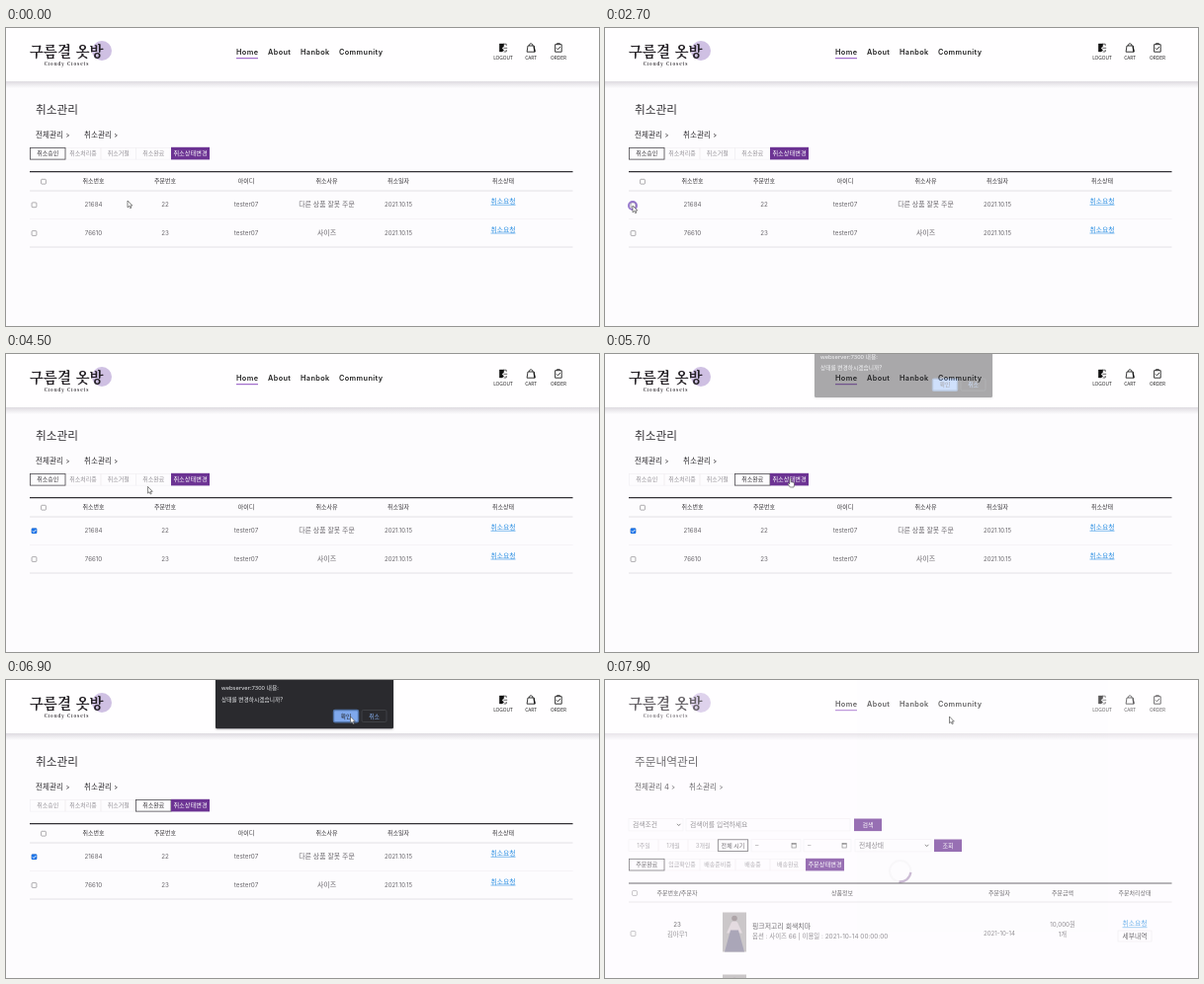
Animation, 600 px wide and 302 px high, one loop 8000 ms. Source, as an HTML page:

```html
<!DOCTYPE html>
<html lang="ko">
<head>
<meta charset="utf-8">
<title>취소관리</title>
<style>
html, body { margin: 0; width: 100%; height: 100%; overflow: hidden; background: #fdfcfe; }
svg { display: block; width: 100vw; height: 100vh; }
text { font-family: Inter, "Noto Sans CJK KR", "Noto Sans CJK", sans-serif; white-space: pre; }
.brand { font-family: "Noto Serif CJK KR", "Noto Serif", "Noto Sans CJK KR", serif; }
.plain { font-family: "Noto Sans", "Noto Sans CJK KR", "Noto Sans CJK", sans-serif; }
</style>
</head>
<body>
<svg id="stage" viewBox="0 0 600 302"></svg>
<script>
const LOOP = 8000, STEP = 100;
const PURPLE = '#6c3393', INK = '#343236', GREY = '#69666b', PALE = '#949197', LINK = '#2b8fe2';

// y is the vertical middle of the text
const text = (x, y, str, size = 6, fill = INK, anchor = 'middle', more = '') =>
  `<text x="${x}" y="${(y + size * .36).toFixed(2)}" font-size="${size}" fill="${fill}" text-anchor="${anchor}" ${more}>${str}</text>`;
const left = (x, y, str, size, fill, more) => text(x, y, str, size, fill, 'start', more);
const rect = (x, y, w, h, fill, more = '') =>
  `<rect x="${x}" y="${y}" width="${w}" height="${h}" fill="${fill}" ${more}/>`;
const frame = (x, y, w, h, stroke, width = .7) =>
  rect(x, y, w, h, 'none', `stroke="${stroke}" stroke-width="${width}"`);
const path = (d, stroke, width = .8, fill = 'none') =>
  `<path d="${d}" fill="${fill}" stroke="${stroke}" stroke-width="${width}"/>`;
const rule = (y, color, width) => path(`M24 ${y}H573.5`, color, width);
const group = (id, body) => `<g id="${id}">${body}</g>`;

const checkbox = (x, y) => rect(x - 2.4, y - 2.4, 4.8, 4.8, '#fff', 'rx=".8" stroke="#77747a" stroke-width=".6"');
const checked = (x, y) => rect(x - 2.7, y - 2.7, 5.4, 5.4, '#1a73e8', 'rx=".8"') +
  path(`M${x - 1.6} ${y}l1.2 1.3 2.2-2.6`, '#fff', .9);
const link = (x, y, str) => text(x, y, str, 6.8, LINK) + path(`M${x - 12.5} ${y + 3.7}h25`, LINK, .6);
const button = (x, y, w, str, size = 6) =>
  rect(x, y, w, 12.6, PURPLE) + text(x + w / 2, y + 6.3, str, size, '#fff');

function tabs(labels, active, xs, y) {
  const box = i => [xs[i], y, xs[i + 1] - xs[i], 11.7];
  return labels.map((label, i) => frame(...box(i), '#f1eef2', .6) +
    text((xs[i] + xs[i + 1]) / 2, y + 5.8, label, 6, i === active ? INK : PALE)).join('') +
    frame(...box(active), '#444147', .75);
}

function header() {
  const nav = [[233, 'Home'], [265, 'About'], [298, 'Hanbok'], [337, 'Community']];
  return rect(0, 54, 600, 7, 'url(#shade)') + rect(0, 0, 600, 54, '#fffeff') +
    '<circle cx="97" cy="23" r="10" fill="#cfc0e3"/>' +
    left(23.7, 23.7, '구름결 옷방', 14.6, '#252126', 'class="brand" font-weight="700"') +
    text(61.5, 36.2, 'Cloudy Closets', 4.3, '#252126', 'middle', 'class="brand" font-weight="700" letter-spacing=".95"') +
    nav.map(([x, s]) => left(x, 24.6, s, 7.3, '#222', 'font-weight="600" letter-spacing=".4"')).join('') +
    rect(233, 30.2, 22, 1, '#8e4fc0') +
    // door, bag and clipboard
    path('M499.3 16h4.4v2.6l-2 1.9 2 1.9-1.6 1.6h-2.8z', '#111', .4, '#111') +
    path('M503 16.2h3.2v1.8M506.2 22v2h-2.6M503.4 20.3h3.8', '#222', .7) +
    path('M528 18h6.3l.9 6.2h-8.1zM529.3 18c0-3 3.7-3 3.7 0', '#222', .9) + path('M534 18.5l1 5.7', '#111', 1.2) +
    path('M555.6 16.7h6.6v7.5h-6.6zM557.4 16.7v-1h3v1M557 20.3l1.4 1.5 2.4-2.8', '#222', .9) +
    [[503, 'LOGOUT'], [531, 'CART'], [559, 'ORDER']].map(([x, s]) =>
      text(x, 30.6, s, 4.8, '#222', 'middle', 'class="plain" font-weight="500"')).join('');
}

const crumb = (x, str, arrowX) => left(x, 108.5, str, 7.6, INK) +
  path(`M${arrowX} 107.2l2.4 1.6-2.4 1.6`, INK, .7);
const heading = (title) => left(30, 83, title, 11.7, INK, 'font-weight="300"');

function cancelPage() {
  const cols = [88.5, 161, 243, 324.5, 397, 503];
  const titles = ['취소번호', '주문번호', '아이디', '취소사유', '취소일자', '취소상태'];
  const rows = [[179, '21684', '22', '다른 상품 잘못 주문'], [207.7, '76610', '23', '사이즈']];
  const names = ['취소승인', '취소처리중', '취소거절', '취소완료'], xs = [24.4, 60, 96, 131.5, 167];
  return heading('취소관리') + crumb(30, '전체관리', 61.3) + crumb(79, '취소관리', 110) +
    group('tabsBefore', tabs(names, 0, xs, 121.4)) + group('tabsAfter', tabs(names, 3, xs, 121.4)) +
    button(167, 120.8, 39, '취소상태변경', 6.2) +
    rule(145.6, '#333036', 1.2) + rule(165, '#dcd9dd', .8) + rule(193.5, '#f3f0f4', .7) + rule(222, '#dcd9dd', .8) +
    checkbox(38, 155.7) + cols.map((x, i) => text(x, 155.3, titles[i], 6, INK, 'middle', 'font-weight="500"')).join('') +
    rows.map(([y, id, order, reason]) => checkbox(28.5, y + .3) +
      text(cols[0], y, id, 6.2, GREY) + text(cols[1], y, order, 6.2, GREY) + text(cols[2], y, 'tester07', 6.3, GREY) +
      text(cols[3], y, reason, 6.9, GREY) + text(cols[4], y, '2021.10.15', 6, GREY) +
      link(cols[5], y - 3.4, '취소요청')).join('') +
    group('tick', checked(28.5, 179.3));
}

function orderPage() {
  const field = (x, y, w, str) => frame(x, y, w, 12.4, '#efecf0', .6) + left(x + 4, y + 6.2, str, 6.8, GREY);
  const select = (x, y, w, str) => field(x, y, w, str) + path(`M${x + w - 6} ${y + 5.3}l1.7 1.8 1.7-1.8`, '#333', .8);
  const date = (x, w) => field(x, 161.5, w, '–') + frame(x + w - 9, 165.6, 4.2, 4.4, '#444', .6) +
    path(`M${x + w - 9} 166.2h4.2`, '#444', .8);
  const photo = y => `<g transform="translate(119 ${y})">` + rect(0, 0, 24, 40, '#b5b0b2') +
    path('M9 10Q12 8 15 10L20 21H4z', 'none', 0, '#d8cdd2') + path('M8 18h8l6 22H2z', 'none', 0, '#85829a') +
    '<circle cx="12" cy="6" r="2.8" fill="#8b7f82"/></g>';
  const titles = [[73, '주문번호/주문자'], [240, '상품정보'], [399, '주문일자'], [463, '주문금액'], [536, '주문처리상태']];
  return heading('주문내역관리') + crumb(30, '전체관리 4', 67.8) + crumb(85, '취소관리', 116.3) +
    select(24, 140.5, 55, '검색조건') + field(82, 140.5, 166, '검색어를 입력하세요') + button(252, 140.5, 28, '검색') +
    tabs(['1주일', '1개월', '3개월', '전체 시기'], 3, [24, 54, 84, 114.3, 144.7], 161.8) +
    date(148, 50) + date(201, 48) + select(253, 161.5, 77, '전체상태') + button(333, 161.5, 28, '조회') +
    tabs(['주문완료', '입금확인중', '배송준비중', '배송중', '배송완료'], 0, [24.4, 60, 96, 132, 167, 203], 181.3) +
    button(203, 180.8, 39, '주문상태변경', 6.2) +
    rule(206, '#333036', 1.2) + rule(225, '#dcd9dd', .8) + checkbox(30, 216) +
    titles.map(([x, s]) => text(x, 215.6, s, 6, INK, 'middle', 'font-weight="500"')).join('') +
    checkbox(28.5, 257) + text(73, 248, '23', 6.2, INK) + text(73, 258, '김아무1', 6.4, GREY) +
    photo(235.5) + photo(298.5) + left(149, 250, '핑크저고리 회색치마', 6.9, INK) +
    left(149, 260, '옵션 : 사이즈 66 | 이용일 : 2021-10-14 00:00:00', 6.43, GREY) +
    text(399, 256.5, '2021-10-14', 6.1, GREY) + text(463, 248, '10,000원', 6.3, GREY) + text(463, 258, '1개', 6.3, GREY) +
    link(536, 247, '취소요청') + frame(519, 254, 34, 11, '#e6e3e7', .6) + text(536, 259.5, '세부내역', 6.8, INK);
}

const dialog = () => rect(212, -10, 180, 59.3, '#292a2d', 'rx="1.5" filter="url(#drop)"') +
  left(218, 8, 'webserver:7300 내용:', 5.9, '#e8eaed', 'class="plain"') +
  left(218, 19.7, '상태를 변경하시겠습니까?', 5.7, '#e8eaed') +
  rect(331.5, 30.5, 25, 12.2, '#8ab4f8', 'rx="1.4" stroke="#5274a8" stroke-width="1.4" id="ok"') +
  text(344, 36.5, '확인', 5.8, '#202124') +
  rect(360, 30.5, 25, 12, 'none', 'rx="1.4" stroke="#4a4c51" stroke-width=".7"') + text(372.5, 36.5, '취소', 5.8, '#8ab4f8');

const stage = document.getElementById('stage');
stage.innerHTML = `<defs>
  <linearGradient id="shade" x2="0" y2="1"><stop stop-color="#dedbe0"/><stop offset="1" stop-color="#fdfcfe"/></linearGradient>
  <filter id="drop" x="-10%" y="-20%" width="120%" height="150%"><feDropShadow dx="0" dy=".6" stdDeviation="1.2" flood-opacity=".3"/></filter>
  </defs>` + rect(0, 0, 600, 302, '#fdfcfe') + header() +
  group('cancel', cancelPage()) + group('orders', orderPage()) + group('dialog', dialog()) +
  group('loader', rect(0, 0, 600, 302, '#fefcff') +
    '<circle cx="298.7" cy="193.7" r="10.7" fill="none" stroke="#eeecef" stroke-width="2"/>' +
    '<path id="arc" d="M291.13 186.13A10.7 10.7 0 0 1 306.27 186.13" fill="none" stroke="#5d2a78" stroke-width="2.2"/>') +
  '<circle id="ring" fill="none" stroke="#7b55c0" stroke-width="2"/>' +
  group('cursor',
    group('arrow', path('M0 0V6.8L1.6 5.4 2.7 7.7 3.8 7.2 2.7 5H4.8Z', '#444', .65, '#fff')) +
    group('hand', path('M-.7 .7Q0-.5 .7 .7V3.6L3.5 4.3Q4.4 4.5 4.1 6L3.5 9H-.2L-2.5 5.8Q-2.3 4.5-.7 5.6Z', '#444', .6, '#fff')));

const el = Object.fromEntries([...stage.querySelectorAll('[id]')].map(e => [e.id, e]));
const show = (e, on) => e.setAttribute('display', on ? 'inline' : 'none');
const clamp = v => Math.max(0, Math.min(1, v));
const smooth = p => p * p * (3 - 2 * p);

const route = [[0, 123, 175], [500, 123, 175], [1900, 28, 180], [3150, 28, 180], [3800, 128, 164],
  [4000, 128, 164], [4100, 129, 164], [4250, 129, 164], [4600, 147, 127], [5000, 147, 127],
  [5250, 187.5, 126], [6150, 187.5, 126], [6850, 348.5, 37], [LOOP, 348.5, 37]];
const clicks = [2600, 4750, 5250, 7300], RING_TIME = 450;

function cursorAt(t) {
  const i = route.findIndex(k => k[0] > t);
  const [t0, x0, y0] = route[i - 1], [t1, x1, y1] = route[i];
  const p = smooth((t - t0) / (t1 - t0));
  return [x0 + (x1 - x0) * p, y0 + (y1 - y0) * p];
}

function render(t) {
  show(el.cancel, t < 7500);
  show(el.orders, t >= 7500);
  show(el.tabsBefore, t < 4800);
  show(el.tabsAfter, t >= 4800);
  show(el.tick, t >= 2800);

  const open = t < 7400 ? clamp((t - 5600) / 250) : 0;
  el.dialog.setAttribute('opacity', open);
  el.dialog.setAttribute('transform', `translate(0 ${-9 * (1 - open)})`);
  el.ok.setAttribute('fill', t >= 6700 ? '#7fa8ec' : '#8ab4f8');

  el.loader.setAttribute('opacity', t < 7500 ? 0 : 1 - clamp((t - 7700) / 285));
  el.arc.setAttribute('transform', `rotate(${(t - 7508) * .36} 298.7 193.7)`);

  const [x, y] = cursorAt(t);
  const overTabs = y > 121 && y < 133 && x > 24 && x < 206;
  el.cursor.setAttribute('transform', `translate(${x} ${y})`);
  show(el.hand, overTabs);
  show(el.arrow, !overTabs);

  const click = clicks.find(c => t >= c && t < c + RING_TIME);
  show(el.ring, click !== undefined);
  if (click !== undefined) {
    const [cx, cy] = cursorAt(click), age = t - click;
    el.ring.setAttribute('cx', cx);
    el.ring.setAttribute('cy', cy);
    el.ring.setAttribute('r', 1.8 + age * .022);
    el.ring.setAttribute('opacity', 1 - age / RING_TIME);
  }
}

const start = performance.now();
function tick() {
  const t = (performance.now() - start) % LOOP;
  render(Math.floor(t / STEP) * STEP);
  requestAnimationFrame(tick);
}
tick();
</script>
</body>
</html>
```
